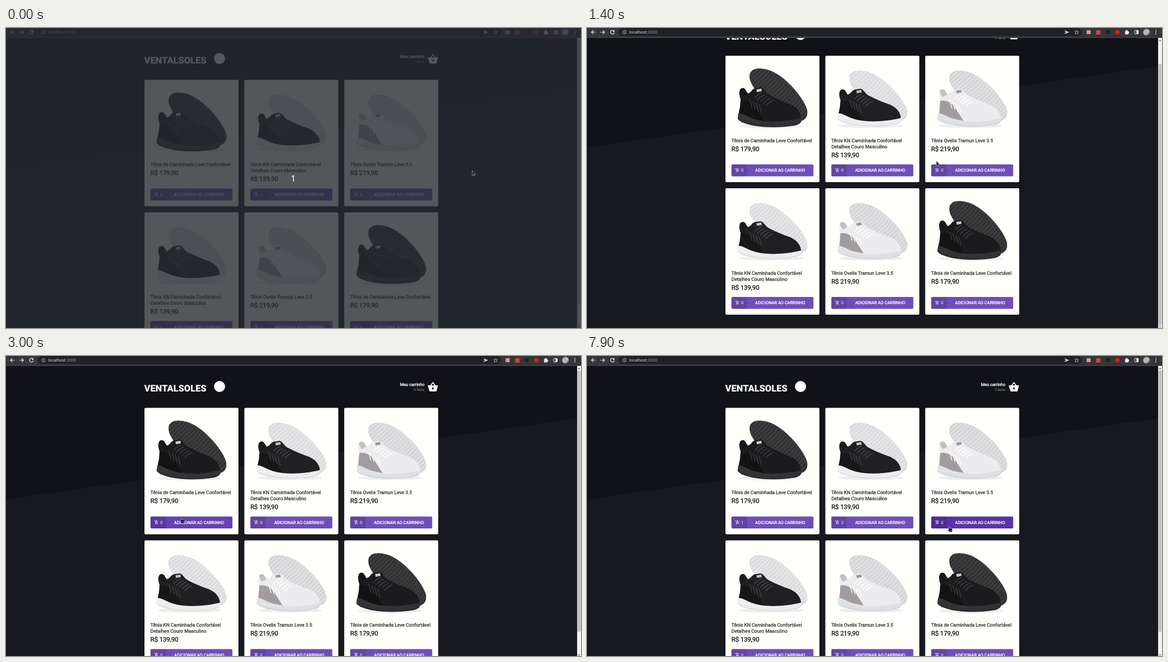
An HTML page for the animation above (8 s loop, 1034 by 541 pixels).

```html
<!DOCTYPE html>
<html lang="pt-BR">
<head>
<meta charset="utf-8">
<title>Loja</title>
<style>
  html, body { margin: 0; width: 100%; height: 100%; overflow: hidden; background: #121318; }
  svg { display: block; width: 1034px; height: 541px; }
  text { font-family: Roboto, Arial, sans-serif; text-rendering: geometricPrecision; white-space: pre; }
  .strong { stroke: currentColor; stroke-width: .32px; fill: currentColor; }
  .url { font-family: "Noto Sans", sans-serif; font-size: 7.4px; }
</style>
</head>
<body>
<svg id="stage" viewBox="0 0 1034 541" xmlns="http://www.w3.org/2000/svg"></svg>
<script>
const LOOP = 8000, STEP = 100;
const CARD = { x: 249, y: 93.5, w: 169, h: 228, dx: 179.6, dy: 239 };
const BUTTON = { x: 10.8, y: 196, w: 147.4, h: 21.5 };

// pointer moves: from, until, target x, target y
const HOME = { x: 838, y: 257 };
const MOVES = [
  [600, 800, 628, 239.5],
  [1500, 1700, 622, 242],
  [1800, 1900, 624, 242],
  [2000, 2300, 622, 263.5],
  [2500, 2900, 340, 248],
  [2900, 3000, 313, 291.5],
  [3000, 3300, 318, 304.5],
  [3500, 3600, 322, 303],
  [4200, 4500, 331, 302.5],
  [4700, 5300, 559, 299.5],
  [6000, 6100, 565, 300],
  [6200, 6400, 604, 318],
  [6400, 6500, 622, 320],
  [6500, 6700, 645, 302],
  [6900, 7300, 560, 304],
  [7600, 7900, 649, 307]
];
const SCROLL = [[0, 0], [1200, .6], [1300, 25], [1400, 43.5], [2300, 36.5], [2400, 15], [2500, 0]];
const COUNTS = [
  [[0, 0], [3800, 1]],
  [[0, 0], [5300, 1], [7500, 2]],
  [[0, 0]]
];

const SHOES = {
  black: { back: '#3b3b3d', rib: '#272728', upper: '#1b1b1d', heel: '#131314', sole: '#343436', edge: '#202022', lace: '#3c3c40', tag: '#c9c9c9', top: 0 },
  mixed: { back: '#e5e5e7', rib: '#d2d2d5', upper: '#202022', heel: '#171718', sole: '#efeff1', edge: '#cfcfd3', lace: '#45454a', tag: '#bdbdbd', top: 1 },
  white: { back: '#dfdfe1', rib: '#cacacd', upper: '#ececef', heel: '#a29c9f', sole: '#e1e2e6', edge: '#c5c6cb', lace: '#ffffff', tag: '#9a9a9d', top: 1 }
};
const PRODUCTS = {
  black: { lines: ['Tênis de Caminhada Leve Confortável'], price: 'R$ 179,90' },
  mixed: { lines: ['Tênis KN Caminhada Confortável', 'Detalhes Couro Masculino'], price: 'R$ 139,90' },
  white: { lines: ['Tênis Ovelis Tramun Leve 3.5'], price: 'R$ 219,90' }
};
const ORDER = ['black', 'mixed', 'white', 'mixed', 'white', 'black'];

const range = (n, f) => Array.from({ length: n }, (_, i) => f(i)).join('');
const path = (d, fill, extra = '') => `<path d="${d}" fill="${fill}" ${extra}/>`;
const line = (d, color, w, extra = '') =>
  `<path d="${d}" fill="none" stroke="${color}" stroke-width="${w}" ${extra}/>`;
const rect = (x, y, w, h, fill, r = 0, extra = '') =>
  `<rect x="${x}" y="${y}" width="${w}" height="${h}" rx="${r}" fill="${fill}" ${extra}/>`;
const circle = (x, y, r, fill, extra = '') => `<circle cx="${x}" cy="${y}" r="${r}" fill="${fill}" ${extra}/>`;
const text = (x, y, size, color, str, extra = '') =>
  `<text x="${x}" y="${y}" font-size="${size}" fill="${color}" color="${color}" ${extra}>${str}</text>`;
const strong = 'class="strong"';

const BACK = 'M44 34C46 23 60 21 77 26C105 34 139 74 146 96C150 112 140 120 126 117C100 108 62 76 50 55C45 47 43 41 44 34Z';
const UPPER = 'M26 62C28 57 33 58 35 60L40 68C46 67 47 61 52 59L63 57C68 58 70 63 75 68C86 75 96 79 108 84C124 89 135 98 136 113L134 119L70 120L24 107C23 97 30 88 27 78C25 72 24 66 26 62Z';
const SOLE = 'M23 104C30 102 40 112 58 116C80 121 110 119 137 112C138 120 134 124 124 126C100 130 70 130 50 126C36 123 22 118 22 112Z';

function shoe(kind) {
  const c = SHOES[kind];
  const ribs = range(24, i => `M${65 + i * 4.4} ${11 + i * 3.9}q-5 9-15 17t-18 19`);
  const laces = range(5, i => `M${65 + i * 5} ${67 + i * 3.4}q-7 3-12 9`);
  const straps = range(4, i => `M${44 + i * 5.5} ${78 + i * 3}l4 16`);
  const treads = range(18, i => `M${27 + i * 6} ${115 + 7 * Math.sin(i / 5.5)}l3 6`);
  return `<g transform="translate(0 ${c.top * 5}) scale(1 ${c.top ? .955 : 1})">
    <ellipse cx="82" cy="127" rx="58" ry="4" fill="#ededee"/>
    ${path(BACK, c.back)}
    ${line(ribs, c.rib, 1.3, 'clip-path="url(#back)"')}
    ${line(BACK, c.rib, .8)}
    ${path(UPPER, c.upper)}
    ${path('M27 80C40 78 50 84 58 100L69 118L25 108Z', c.heel)}
    ${path('M26 62C28 57 33 58 35 60L40 68L31 73Z', c.heel, 'opacity=".55"')}
    ${line(laces, c.lace, 1.7, 'stroke-linecap="round"')}
    ${line(straps, c.lace, 1.3)}
    ${rect(56, 60, 9, 5, c.tag, 0, 'transform="rotate(-10 60 62)"')}
    ${path(SOLE, c.sole)}
    ${line(treads, c.edge, .8, 'opacity=".7"')}
    ${line('M22 113C30 130 134 134 137 115', c.edge, .9)}
  </g>`;
}

function cartIcon(x, y) {
  return `<g transform="translate(${x} ${y}) scale(.36)" fill="none" stroke="#fff" stroke-width="2">
    <path d="M1 3h2.6l4.4 9h7.6l4.2-7.5M8 12l-2 3.6q0 .4 1 .4h12M12 1v8M8 5h8"/>
    <circle cx="7" cy="20" r="1"/><circle cx="17" cy="20" r="1"/></g>`;
}

function card(kind, i) {
  const p = PRODUCTS[kind], n = p.lines.length, b = BUTTON;
  const x = CARD.x + (i % 3) * CARD.dx, y = CARD.y + Math.floor(i / 3) * CARD.dy;
  return `<g transform="translate(${x} ${y})">
    ${rect(0, 0, CARD.w, CARD.h, '#fffffc', 2)}
    ${shoe(kind)}
    ${p.lines.map((s, k) => text(b.x, 155.6 + k * 10.9, 8.62, '#333', s, strong)).join('')}
    ${text(b.x, 160.8 + n * 10.9, 11.3, '#111', p.price, strong)}
    ${rect(b.x, b.y, b.w, b.h, '#704eb9', 2, `id="btn${i}"`)}
    ${rect(b.x, b.y, 28.2, b.h, '#000', 2, 'opacity=".12"')}
    ${cartIcon(17.2, 202.2)}
    ${text(28.3, 209.3, 7.54, '#fff', '0', `id="qty${i}"`)}
    ${text(53.6, 209.3, 7.54, '#fff', 'ADICIONAR AO CARRINHO', strong)}
  </g>`;
}

function page() {
  return `${rect(0, 0, 1034, 640, '#18191f')}
    ${path('M0 0H1034V111.5L0 258.5Z', '#111217')}
    ${text(248.5, 64, 16.6, '#fff', 'VENTALSOLES', 'font-weight="800"')}
    ${circle(384, 55, 10, '#fff')}
    ${text(752.6, 54.2, 7.54, '#fff', 'Meu carrinho', strong + ' text-anchor="end"')}
    ${text(752.4, 63, 6.46, '#999', '0 itens', 'id="total" text-anchor="end"')}
    ${path('M759 53.4H776.4L773.5 63.4H762Z', '#fff', 'stroke="#fff" stroke-linejoin="round"')}
    ${line('M763.2 54L767.7 47.8L772.2 54', '#fff', 1.6, 'stroke-linejoin="round"')}
    ${circle(767.7, 58.4, 1.7, '#111217')}
    ${ORDER.map(card).join('')}`;
}

const ICON = '#e8eaed';

function starPath(x, y, r) {
  return 'M' + Array.from({ length: 10 }, (_, i) => {
    const a = i * Math.PI / 5, k = i % 2 ? r * .48 : r;
    return `${(x + k * Math.sin(a)).toFixed(2)} ${(y - k * Math.cos(a)).toFixed(2)}`;
  }).join('L') + 'Z';
}

function addressBar() {
  return `${rect(0, 0, 1034, 18, '#35363a')}${rect(0, 17, 1034, 1, '#47484b')}
    ${rect(57, 0, 833, 14.6, '#202124', 7.3)}
    ${line('M15 7.5h-7m3.3-3.3l-3.3 3.3l3.3 3.3M24.5 7.5h7m-3.3-3.3l3.3 3.3l-3.3 3.3', ICON, 1.2)}
    ${line('M48.4 5.4A3.4 3.4 0 1 0 49 8.4', ICON, 1.2)}${path('M49.4 3.4v3.6h-3.6Z', ICON)}
    ${circle(67.3, 7.5, 3.2, 'none', `stroke="${ICON}" stroke-width=".7"`)}
    ${line('M67.3 7v2.4m0-4v.9', ICON, .8)}
    ${text(76, 10.2, 7.4, ICON, 'localhost<tspan fill="#9aa0a6">:3000</tspan>', 'class="url"')}
    ${path('M859.5 4.4l7.5 3.1l-7.5 3.2v-2.4l4.5-.8l-4.5-.7Z', ICON)}
    ${line(starPath(880.5, 7.9, 3.7), ICON, .7)}`;
}

function extensions() {
  return `${rect(898.5, 4, 7, 7, '#dd9f9b')}${rect(915.5, 3.8, 8, 8, '#cf4338')}
    ${rect(932.5, 4, 8, 7, '#222326')}${circle(953.6, 7.5, 4.2, '#d5201f')}
    ${rect(967.5, 5.2, 6.2, 6.2, ICON, .5)}${circle(970.7, 4.9, 1.3, ICON)}${circle(973.8, 8.3, 1.3, ICON)}
    ${rect(984.9, 4.4, 6.4, 6.2, 'none', .6, `stroke="${ICON}"`)}${rect(988, 4.4, 3.5, 6.2, ICON)}
    ${circle(1006, 7.5, 6, 'url(#face)')}
    ${range(3, i => circle(1023, 4.5 + i * 3, .9, ICON))}`;
}

const outline = 'stroke="#d8d8d8" stroke-width=".55"';

document.getElementById('stage').innerHTML = `
  <defs>
    <clipPath id="back"><path d="${BACK}"/></clipPath>
    <linearGradient id="face" x2="1" y2="1"><stop stop-color="#7e95b5"/><stop offset=".55" stop-color="#c9bfb8"/><stop offset="1" stop-color="#4b5566"/></linearGradient>
  </defs>
  <g id="page">${page()}</g>
  ${rect(1027, 18, 7, 523, '#f1f1f1')}
  ${rect(1027.6, 26, 5.8, 471, '#c1c1c1', 0, 'id="thumb"')}
  ${path('M1028.5 23.8l2-2.8l2 2.8ZM1028.5 538l2 2.6l2-2.6Z', '#606060')}
  ${addressBar()}${extensions()}
  <g id="dim">${rect(0, 0, 1034, 541, '#262b30', 0, 'opacity=".79"')}
    ${text(516.5, 276.5, 16, '#fff', '1', 'text-anchor="middle" style="font-family:\'Noto Sans\',sans-serif"')}</g>
  <g id="arrow">${path('M.3 .3V9L2.3 7.2L3.7 10.2L5 9.6L3.7 6.7H6.4Z', '#161616', outline)}</g>
  <g id="hand">${path('M1.3 .9Q2.6 0 3 1.4V3.4Q7.6 3.2 8 5.4V8L7 10.6H2.8L.2 7.3Q-.4 6 1.3 5.9Z', '#1b1b1b', outline)}
    ${line('M3.4 7v2m1.4-2v2m1.4-2v2', '#aaa', .5)}</g>`;

const el = id => document.getElementById(id);
const at = (table, t) => table.reduce((found, row) => row[0] <= t ? row : found, table[0])[1];
const move = (id, x, y) => el(id).setAttribute('transform', `translate(${x} ${y})`);
const blend = k => 'rgb(' + [[112, 90], [78, 51], [185, 171]].map(([a, b]) => Math.round(a + (b - a) * k)) + ')';

function pointer(t) {
  let { x, y } = HOME;
  for (const [from, until, tx, ty] of MOVES) {
    const k = Math.min(1, Math.max(0, (t - from) / (until - from)));
    x += (tx - x) * k;
    y += (ty - y) * k;
  }
  return { x, y };
}

// index of the first-row button under the pointer, or -1
function hovered(t) {
  const { x, y } = pointer(t);
  const top = CARD.y + BUTTON.y - at(SCROLL, t);
  if (y < top || y > top + BUTTON.h) return -1;
  return [0, 1, 2].findIndex(i => {
    const left = CARD.x + i * CARD.dx + BUTTON.x;
    return x >= left && x <= left + BUTTON.w;
  });
}

function draw(time) {
  const t = Math.floor(time % LOOP / STEP) * STEP;
  const scroll = at(SCROLL, t);
  const { x, y } = pointer(t);
  const over = hovered(t), before = hovered(Math.max(0, t - STEP));
  move('page', 0, -scroll);
  move('thumb', 0, scroll * .9);
  move('arrow', x, y);
  move('hand', x, y);
  el('arrow').style.display = over < 0 ? '' : 'none';
  el('hand').style.display = over < 0 ? 'none' : '';
  el('dim').style.display = t < 100 ? '' : 'none';
  const counts = COUNTS.map(c => at(c, t));
  counts.forEach((n, i) => {
    el('qty' + i).textContent = n;
    el('btn' + i).setAttribute('fill', blend(((over === i) + (before === i)) / 2));
  });
  el('total').textContent = counts.filter(Boolean).length + ' itens';
}

const start = performance.now();
function tick() {
  draw(performance.now() - start);
  requestAnimationFrame(tick);
}
tick();
</script>
</body>
</html>
```
